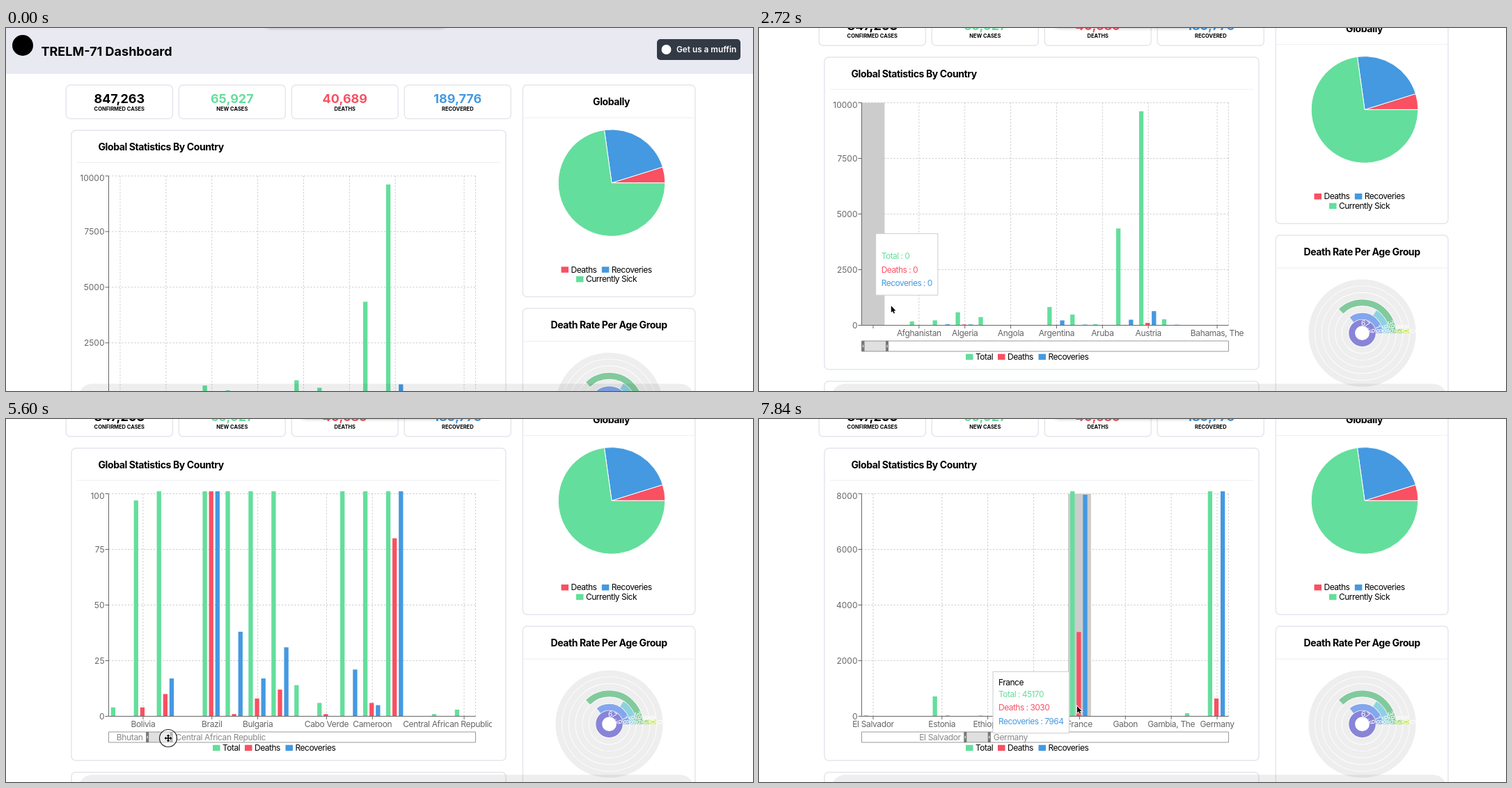
An HTML page with a canvas for the animation above (8000 ms loop, 1073 by 522 pixels).

```html
<!DOCTYPE html>
<html lang="en">
<head>
<meta charset="utf-8">
<title>Dashboard</title>
<style>
html, body { margin: 0; width: 100%; height: 100%; overflow: hidden; background: #fff; }
canvas { display: block; }
</style>
</head>
<body>
<canvas id="stage" width="1073" height="522"></canvas>
<script>
const ctx = document.getElementById('stage').getContext('2d');
const LOOP = 8000, STEP = 160;
const GREEN = '#64de9c', RED = '#f95062', BLUE = '#4499e1', GRAY = '#666';
const COLORS = [GREEN, RED, BLUE], SERIES = ['Total', 'Deaths', 'Recoveries'];
const PLOT = { x: 147.5, y: 212.8, w: 527, h: 320 }, SHOWN = 16;
const BAND = PLOT.w / SHOWN, BASE = PLOT.y + PLOT.h, CLIP_RIGHT = 698;

// name: total, deaths, recoveries
const countries = [
  ':;Åland:;Afghanistan:174;Albania:223 11 44;Algeria:584 35 37;Andorra:370;Angola:;Antigua and Barbuda:',
  'Argentina:820 20 220;Armenia:482 3 30;Aruba:50;Australia:4350 18 250;Austria:9618 110 636;Azerbaijan:273 5 26',
  'Bahamas:;Bahamas, The:;Bahrain:567 4 295;Bangladesh:51;Barbados:34;Belarus:152 1 47;Belgium:12775 705 1696',
  'Belize:3;Benin:9;Bhutan:4;Bolivia:97 4;Bosnia and Herzegovina:413 10 17;Botswana:;Brazil:5717 201 127',
  'Brunei:129 1 38;Bulgaria:399 8 17;Burkina Faso:261 12 31;Burma:14;Cabo Verde:6 1;Cambodia:109 0 21',
  'Cameroon:193 6 5;Canada:8527 80 1592;Cape Verde:;Caribbean:1;Central African Republic:3;Cayman Islands:12',
  'Chad:7;Channel Islands:141;Chile:2738 12 156;China:82279 3309 76206;Colombia:798 14 15;Congo (Brazzaville):19',
  "Congo (Kinshasa):98;Costa Rica:330 2 4;Cote d'Ivoire:168 1 6;Croatia:790 6 67;Cruise Ship:712 8 565;Cuba:170 4 4",
  'Curacao:;Cyprus:230 7 22;Czechia:3308 23 25;Denmark:3039 77 73;Diamond Princess:712 10 603;Djibouti:18',
  'Dominica:12;Dominican Republic:901 42 5;East Timor:1;Ecuador:2240 60 3;Egypt:656 41 150;El Salvador:32',
  'Equatorial Guinea:;Eritrea:;Estonia:715 4 26;Eswatini:;Ethiopia:26;Faroe Islands:169;Fiji:;Finland:1418 17 10',
  'France:45170 3030 7964;French Guiana:;Gabon:;Gambia:;Gambia, The:;Georgia:110;Germany:71808 640 16100'
].join(';').split(';').map(entry => {
  const [name, nums] = entry.split(':');
  return { name, values: nums ? nums.split(' ') : [] };
});

const scrollKeys = [[160, 0], [1280, 64.5], [1920, 105.3]];
const pillKeys = [[160, 368], [1120, 420]];
const windowKeys = [[4480, 0], [5600, 23], [6880, 47], [7040, 47], [7360, 63]];
const cursorKeys = [
  [960, 250, 335], [1280, 237, 344], [1760, 150, 380], [2080, 135, 382], [2240, 152, 384],
  [3040, 215, 410], [3680, 285, 414], [4000, 240, 440], [4320, 181, 459], [4480, 181, 459],
  [5600, 233, 459], [6880, 289, 462], [7040, 294, 466], [7360, 331, 460],
  [7520, 370, 420], [7680, 450, 413], [7840, 457, 413]
];

function at(keys, t) {
  const i = keys.findIndex(k => k[0] > t);
  if (i < 0) return keys[keys.length - 1].slice(1);
  if (i === 0) return keys[0].slice(1);
  const a = keys[i - 1], b = keys[i], u = (t - a[0]) / (b[0] - a[0]);
  return a.slice(1).map((v, j) => v + (b[j + 1] - v) * u);
}

// y is the middle of the capitals
function text(s, x, y, { size = 12, weight = 400, color = '#000', align = 'left', gap = 0 } = {}) {
  ctx.font = `${weight} ${size}px Inter, sans-serif`;
  ctx.letterSpacing = gap + 'px';
  ctx.textAlign = align;
  ctx.fillStyle = color;
  ctx.fillText(s, x, y + size * 0.364);
}

function textWidth(s, gap) {
  ctx.font = '400 12px Inter, sans-serif';
  ctx.letterSpacing = gap + 'px';
  return ctx.measureText(s).width;
}

function rect(x, y, w, h, color) {
  ctx.fillStyle = color;
  ctx.fillRect(x, y, w, h);
}

function line(x1, y1, x2, y2, color, dash = []) {
  ctx.beginPath();
  ctx.setLineDash(dash);
  ctx.moveTo(x1, y1);
  ctx.lineTo(x2, y2);
  ctx.strokeStyle = color;
  ctx.lineWidth = 1;
  ctx.stroke();
  ctx.setLineDash([]);
}

function box(x, y, w, h, r, fill, stroke, width = 1) {
  ctx.beginPath();
  ctx.roundRect(x, y, w, h, r);
  if (fill) { ctx.fillStyle = fill; ctx.fill(); }
  if (stroke) { ctx.strokeStyle = stroke; ctx.lineWidth = width; ctx.stroke(); }
}

function disc(x, y, r, color) {
  ctx.beginPath();
  ctx.arc(x, y, r, 0, 7);
  ctx.fillStyle = color;
  ctx.fill();
}

const card = (x, y, w, h) => box(x, y, w, h, 6, '#fff', '#e4e6ed', 1.5);
const heading = (s, x, y, align) => text(s, x, y, { size: 14, weight: 700, gap: -0.4, align });

function legendItem(label, color, x, y) {
  rect(x, y - 4, 10.5, 8.5, color);
  text(label, x + 14, y, { gap: -0.5 });
}

function drawHeader() {
  rect(0, 0, 1073, 66, '#e9e9f2');
  disc(24, 25, 15, '#000');
  text('TRELM-71 Dashboard', 50.5, 33.5, { size: 18, weight: 700 });
  box(935, 16, 120, 30, 5, '#323a45');
  disc(948.5, 31, 7, '#fff');
  text('Get us a muffin', 963, 31, { size: 11.8, weight: 600, color: '#fff' });
}

function drawCounters() {
  [['847,263', 'CONFIRMED CASES', '#000'], ['65,927', 'NEW CASES', GREEN],
   ['40,689', 'DEATHS', RED], ['189,776', 'RECOVERED', BLUE]].forEach(([n, label, color], i) => {
    const x = 86.3 + 162 * i, mid = x + 76.5;
    card(x, 82, 153, 48.5);
    text(n, mid, 101.5, { size: 18, weight: 700, color, align: 'center' });
    text(label, mid, 116.5, { size: 7.5, weight: 700, align: 'center' });
  });
}

function drawPie() {
  card(742.3, 82, 247.5, 304.5);
  heading('Globally', 869.5, 106, 'center');
  line(742, 129, 990, 129, '#eceef2');
  const sum = 847263, cuts = [0, 40689 / sum, (40689 + 189776) / sum, 1];
  [RED, BLUE, GREEN].forEach((color, i) => {
    ctx.beginPath();
    ctx.moveTo(870, 222.7);
    ctx.arc(870, 222.7, 76.8, -cuts[i] * 2 * Math.PI, -cuts[i + 1] * 2 * Math.PI, true);
    ctx.closePath();
    ctx.fillStyle = color;
    ctx.fill();
    ctx.strokeStyle = '#fff';
    ctx.lineWidth = 1;
    ctx.stroke();
  });
  legendItem('Deaths', RED, 797.5, 347.3);
  legendItem('Recoveries', BLUE, 855.8, 347.3);
  legendItem('Currently Sick', GREEN, 819, 361);
}

function drawAgeRings() {
  card(742.3, 403.3, 247.5, 320);
  heading('Death Rate Per Age Group', 866, 427.3, 'center');
  line(742, 450.5, 990, 450.5, '#eceef2');
  const cx = 866.5, cy = 544, pitch = 9.65;
  const arc = (r, deg, color) => {
    ctx.beginPath();
    ctx.arc(cx, cy, r, 0, -deg * Math.PI / 180, true);
    ctx.strokeStyle = color;
    ctx.lineWidth = 8.8;
    ctx.stroke();
  };
  const rings = [['#8884d8', 359.9, '67.9'], ['#83a6ed', 128, '18'], ['#8dd1e1', 58, '98'],
    ['#82ca9d', 134, '396'], ['#a4de6c', 6, '83'], ['#d0ed57', 5, '80'], ['#ffc658', 0, '0']];
  rings.forEach(([color, deg, label], i) => {
    const r = 14.8 + pitch * i, step = 6.2 / r;
    arc(r, 360, '#eee');
    if (deg) arc(r, deg, color);
    [...label].forEach((ch, j) => {
      const a = (label.length - 0.5 - j) * step;
      ctx.save();
      ctx.translate(cx + r * Math.cos(a), cy - r * Math.sin(a));
      ctx.rotate(Math.PI / 2 - a);
      text(ch, 0, 0, { size: 10.5, color: '#fff', align: 'center' });
      ctx.restore();
    });
  });
}

// Tick step: a quarter of the top value, rounded up
function tickStep(max) {
  const digits = Math.floor(Math.log10(max / 4)) + 1;
  const scale = 10 ** digits, ratio = digits === 1 ? 0.1 : 0.05;
  return Math.round(Math.ceil(max / 4 / scale / ratio) * ratio * scale);
}

// Labels are kept from the right end as long as they do not touch
function pickLabels(rows) {
  const kept = [];
  let limit = 800;
  for (let i = SHOWN - 1; i >= 0; i--) {
    const tick = PLOT.x + BAND * (i + 0.5), w = textWidth(rows[i].name, -0.35);
    const x = Math.min(tick, 699.5 - w / 2);
    if (x + w / 2 + 5 > limit) continue;
    kept.push({ name: rows[i].name, tick, x });
    limit = x - w / 2;
  }
  return kept;
}

function drawChart(first, active, showEnds) {
  card(94, 147.3, 624, 449);
  heading('Global Statistics By Country', 132.5, 171);
  line(102, 193.5, 710, 193.5, '#eceef2');

  const rows = countries.slice(first, first + SHOWN);
  // the top value is the greatest as text, so taller bars may be cut off
  const top = rows.flatMap(r => r.values).sort().pop();
  const step = tickStep(+top), labels = pickLabels(rows);

  for (let i = 0; i <= 4; i++) {
    const y = BASE - PLOT.h * i / 4;
    line(PLOT.x, y, PLOT.x + PLOT.w, y, '#ccc', [2.3, 2.3]);
    line(PLOT.x - 5, y, PLOT.x, y, GRAY);
    text(String(step * i), 141.5, y + (i === 4 ? 3 : 0), { color: GRAY, align: 'right' });
  }
  const right = PLOT.x + PLOT.w;
  line(right, PLOT.y, right, BASE, '#ccc', [2.3, 2.3]);
  labels.forEach(l => line(l.tick, PLOT.y, l.tick, BASE, '#ccc', [2.3, 2.3]));
  if (active >= 0) rect(PLOT.x + BAND * active, PLOT.y, BAND, PLOT.h, '#ccc');

  ctx.save();
  ctx.beginPath();
  ctx.rect(95, 209.2, CLIP_RIGHT - 95, 375);
  ctx.clip();
  rows.forEach((row, i) => row.values.forEach((v, j) => {
    const h = v / (step * 4) * PLOT.h;
    rect(PLOT.x + BAND * i + 3.2 + 9.1 * j, BASE - h, 6.3, h, COLORS[j]);
  }));
  line(PLOT.x, PLOT.y, PLOT.x, BASE, GRAY);
  line(PLOT.x, BASE, right, BASE, GRAY);
  labels.forEach(l => {
    line(l.tick, BASE, l.tick, BASE + 4.5, GRAY);
    text(l.name, l.x, 543.6, { color: GRAY, align: 'center', gap: -0.35 });
  });
  ctx.restore();

  drawSlider(first, rows, showEnds);
  SERIES.forEach((s, i) => legendItem(s, COLORS[i], [297, 343, 401.5][i], 578));
}

function drawSlider(first, rows, showEnds) {
  const y = 555.3, h = 15, x = PLOT.x + first * 2.33, w = 38.5;
  box(PLOT.x, y, PLOT.w, h, 0, '#fff', '#999');
  rect(x, y, w, h, 'rgba(102,102,102,.2)');
  [x, x + w - 4].forEach(hx => {
    rect(hx, y, 4, h, '#777');
    rect(hx + 1.3, y + 5.7, 1.4, 3.6, '#ddd');
  });
  if (!showEnds) return;
  const style = { color: '#888', gap: -0.35 };
  text(rows[0].name, x - 4.5, y + 7.7, { ...style, align: 'right' });
  text(rows[SHOWN - 1].name, x + w + 4, y + 7.7, style);
}

function drawTooltip(row, x, y) {
  const lines = SERIES.map((s, i) => `${s} : ${row.values[i] || 0}`);
  const w = Math.max(...lines.map(s => textWidth(s, -0.52))) + 16;
  box(x, y, w, 88.5, 0, '#fff', '#ccc');
  text(row.name, x + 8, y + 15.3, { gap: -0.5 });
  lines.forEach((s, i) => text(s, x + 8, y + 32 + 19.6 * i, { color: COLORS[i], gap: -0.52 }));
}

function drawCursor(x, y, pressed, moving) {
  const ring = (cx, cy) => box(cx - 12.5, cy - 12.5, 25, 25, 12.5, 'rgba(255,255,255,.45)', '#222', 1.2);
  if (moving) {
    ring(x, y);
    ctx.beginPath();
    for (let k = 0; k < 4; k++) {
      const c = [1, 0, -1, 0][k], s = [0, 1, 0, -1][k];
      const p = (u, v) => [x + u * c - v * s, y + u * s + v * c];
      ctx.moveTo(...p(5.5, 0));
      ctx.lineTo(...p(3, 2.3));
      ctx.lineTo(...p(3, 0.8));
      ctx.lineTo(...p(0, 0.8));
      ctx.lineTo(...p(0, -0.8));
      ctx.lineTo(...p(3, -0.8));
      ctx.lineTo(...p(3, -2.3));
      ctx.closePath();
    }
    ctx.fillStyle = '#000';
    ctx.fill();
    return;
  }
  if (pressed) ring(x + 2, y + 5);
  ctx.beginPath();
  [[0, 0], [0, 9.5], [2.2, 7.6], [3.7, 11], [5.2, 10.4], [3.8, 7.1], [6.6, 6.9]]
    .forEach(([dx, dy]) => ctx.lineTo(x + dx, y + dy));
  ctx.closePath();
  ctx.strokeStyle = '#fff';
  ctx.lineWidth = 1.6;
  ctx.stroke();
  ctx.fillStyle = '#000';
  ctx.fill();
}

function drawOverlays(pillX) {
  box(104, 511.5, 884, 40, 22, 'rgba(0,0,0,.065)');
  ctx.save();
  ctx.shadowColor = 'rgba(0,0,0,.35)';
  ctx.shadowBlur = 5;
  box(pillX, -30, 267, 29.5, 12, '#d6d6da');
  ctx.restore();
}

function draw(t) {
  const [scroll] = at(scrollKeys, t), [pillX] = at(pillKeys, t);
  const first = Math.round(at(windowKeys, t)[0]);
  const [cx, cy] = at(cursorKeys, t);
  const [hx, hy] = at(cursorKeys, t - STEP); // hover trails the pointer
  const late = t > 7360;
  const hovering = (t >= 2240 && t < 4320 || late) && hx > PLOT.x && hy < BASE - scroll;
  const active = hovering ? Math.floor((hx - PLOT.x) / BAND) : -1;

  rect(0, 0, 1073, 522, '#fff');
  ctx.save();
  ctx.translate(0, -scroll);
  drawHeader();
  drawCounters();
  drawPie();
  drawAgeRings();
  drawChart(first, active, t > 4480);
  card(94, 613.3, 624, 200);
  ctx.restore();

  if (active >= 0) {
    const x = late ? 336 : PLOT.x + BAND * (active + 0.5) + 3.7;
    drawTooltip(countries[first + active], x, hy + (late ? -49.7 : -98.7));
  }
  drawOverlays(pillX);
  const moving = t >= 4320 && t < 6880 || t > 7040 && t <= 7360;
  if (t >= 960) drawCursor(cx, cy, t >= 1120 && t < 1600, moving);
}

function tick(now) {
  draw(Math.floor(now % LOOP / STEP) * STEP);
  requestAnimationFrame(tick);
}
requestAnimationFrame(tick);
</script>
</body>
</html>
```
